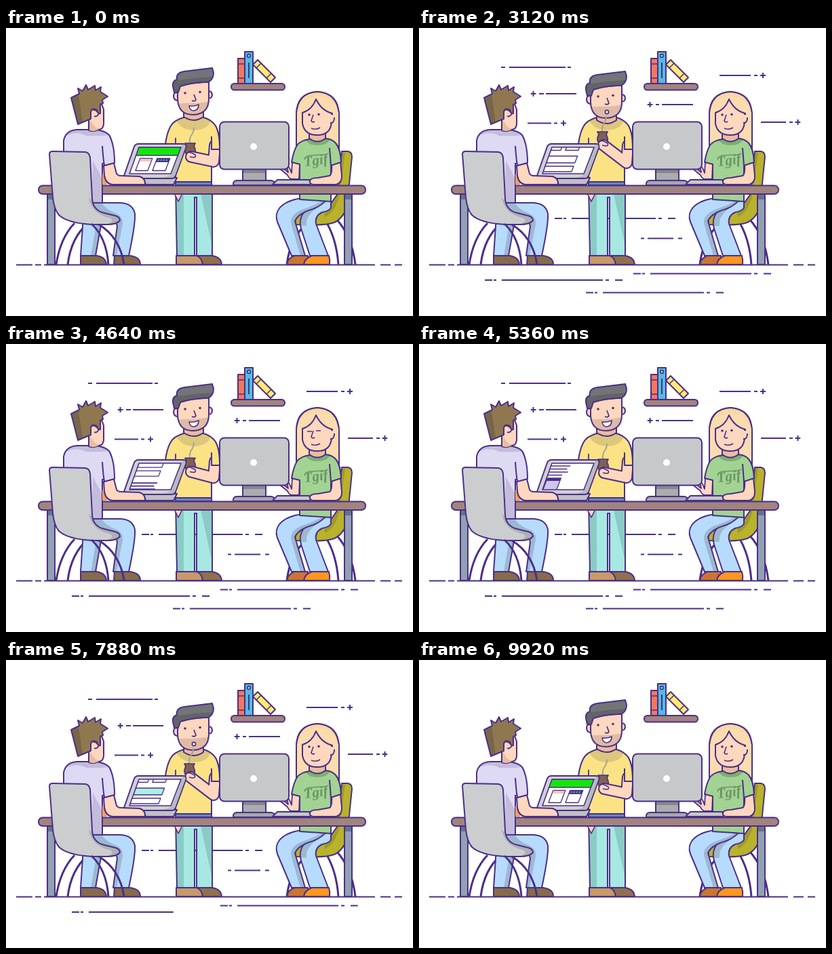
An HTML page with a canvas for the animation above (10000 ms loop, 600 by 425 pixels).

```html
<!DOCTYPE html>
<html lang="en">
<head>
<meta charset="utf-8">
<title>Team at a desk</title>
<style>
html, body { margin: 0; width: 100%; height: 100%; overflow: hidden; background: #fff; }
canvas { display: block; width: 600px; height: 425px; }
</style>
</head>
<body>
<canvas id="stage" width="600" height="425"></canvas>
<script>
const ctx = document.getElementById('stage').getContext('2d');
const LOOP = 10000;
const INK = '#4b2f8a';
const SKIN = '#fdd7be';
const SKIN_SHADE = '#e9bd9f';
const DENIM = '#b7dbfd';
const DENIM_SHADE = '#9db8d0';

const paths = new Map();
function path(d) {
  if (!paths.has(d)) paths.set(d, new Path2D(d));
  return paths.get(d);
}
function shape(d, fill, width = 2) {
  const p = path(d);
  if (fill) { ctx.fillStyle = fill; ctx.fill(p); }
  if (width) { ctx.lineWidth = width; ctx.strokeStyle = INK; ctx.stroke(p); }
}
const tint = (d, fill) => shape(d, fill, 0);
const line = (d, width = 2) => shape(d, null, width);

function box(x, y, w, h, r, fill, width = 2) {
  ctx.beginPath();
  ctx.roundRect(x, y, w, h, r);
  ctx.fillStyle = fill;
  ctx.fill();
  if (width) { ctx.lineWidth = width; ctx.strokeStyle = INK; ctx.stroke(); }
}
function dot(x, y, r, fill = INK, width = 0) {
  ctx.beginPath();
  ctx.arc(x, y, r, 0, Math.PI * 2);
  ctx.fillStyle = fill;
  ctx.fill();
  if (width) { ctx.lineWidth = width; ctx.strokeStyle = INK; ctx.stroke(); }
}
// Shade only the part of d that lies inside the outline.
function shaded(outline, fill, d, shade) {
  tint(outline, fill);
  ctx.save();
  ctx.clip(path(outline));
  tint(d, shade);
  ctx.restore();
  line(outline);
}
function keys(t, list) {
  let [t0, v0] = list[0];
  for (const [t1, v1] of list) {
    if (t < t1) {
      const k = Math.max(0, (t - t0) / (t1 - t0));
      return v0 + (v1 - v0) * k * k * (3 - 2 * k);
    }
    t0 = t1; v0 = v1;
  }
  return v0;
}

// Background dashes: height, solid parts, plus centre, start and exit times
const wide = x => [[x, x + 11], [x + 13, x + 17], [x + 25, x + 174], [x + 178, x + 183], [x + 192, x + 203]];
const streaks = [
  { y: 390.5, parts: wide(246), start: 60, exit: 7340 },
  { y: 372, parts: wide(97), start: 300, exit: 7720 },
  { y: 362.5, parts: wide(316), start: 480, exit: 7870 },
  { y: 70, parts: [[443, 489], [494, 499]], plus: 507, start: 680, exit: 8050 },
  { y: 58, parts: [[121, 127], [133, 216], [219, 224]], start: 1060, exit: 8380 },
  { y: 139, parts: [[504, 541], [546, 551]], plus: 558.5, start: 1180, exit: 8500 },
  { y: 140.5, parts: [[160, 195], [199, 204]], plus: 213, start: 1300, exit: 8650 },
  { y: 310.5, parts: [[327, 332], [337, 375], [382, 388]], start: 1400, exit: 8800 },
  { y: 281, parts: [[200, 211], [213, 217], [225, 349], [353, 358], [367, 378]], start: 1560, exit: 9060 },
  { y: 97, parts: [[177, 184], [187, 232]], plus: 168.5, start: 1860, exit: 9260, fromRight: true },
  { y: 113, parts: [[349, 354], [358, 404]], plus: 340.5, start: 2060, exit: 9400, fromRight: true }
];
function drawStreaks(t) {
  for (const s of streaks) {
    const p = keys(t, [[s.start, 0], [s.start + 500, 1], [s.exit, 1], [s.exit + 480, 0]]);
    if (p <= 0) continue;
    const xs = s.parts.flat();
    if (s.plus) xs.push(s.plus - 4, s.plus + 4);
    const left = Math.min(...xs), span = Math.max(...xs) - left;
    ctx.save();
    ctx.beginPath();
    ctx.rect(s.fromRight ? left + span * (1 - p) : left, s.y - 6, span * p, 12);
    ctx.clip();
    for (const [a, b] of s.parts) line(`M${a},${s.y}H${b}`);
    if (s.plus) line(`M${s.plus - 4},${s.y}h8M${s.plus},${s.y - 4}v8`);
    ctx.restore();
  }
}

function drawRoom() {
  line('M15,349.5H39M43,349.5H52M56,349.5H544M552,349.5H567M573,349.5H584');
  box(342, 45, 10, 37, 0, '#f4775c');
  line('M342,53h10M342,74h10', 1.5);
  box(352, 35, 12, 47, 0, '#52bde0');
  dot(358, 41, 2.4, '#8fdcf2', 1.6);
  line('M358,51V74');
  shape('M371,47L397,73L390,80L364,54Z', '#ffea70');
  line('M376,52l-7,7M391,67l-7,7', 1.5);
  box(332, 82, 79, 9.5, 4.5, '#a1847d');
}

function drawDesk() {
  box(61, 242, 11, 107, 0, '#91a1b1');
  box(499, 242, 11, 107, 0, '#91a1b1');
  tint('M62,245h9v8h-9zM500,245h9v8h-9z', '#64738b');
  box(48, 232.5, 482, 12.5, 6, '#a1847d');
}

function drawStander(sip, raise) {
  // Trousers and shoes
  shaded('M250,232H304V336H281V250H278V336H252Z', '#a7e8e2',
    'M249,245h13v92h-13zM287,245L304,322V245z', '#8bcbc6');
  line('M278,249V336M281,249V336', 1.5);
  shape('M251,336H281Q289,338 290,349H251Z', '#c89a68');
  shape('M282,336H304Q317,338 318,349H290Q289,340 282,336Z', '#91704e');
  shape('M250,227H303V232H250Z', '#638bc1');

  // Shirt
  shaded('M262,132Q247,136 242,146Q237,156 235,171L250,174V227H303V178H315Q315,153 308,143Q302,135 291,132Z',
    '#fbe285', 'M250,134Q256,150 277,151Q298,150 302,136L277,126Z', '#dcc77c');
  line('M250,162V174M303,160V178', 1.8);

  // Head
  ctx.save();
  ctx.translate(0, 5 * sip);
  shape('M262,122V131Q277,141 291,131V122Z', SKIN_SHADE);
  shape('M255,96Q247,93 247,101Q248,108 255,107', SKIN);
  shape('M298,93Q304,93 304,99Q303,105 298,103', SKIN);
  shaded('M253,84V105Q254,128 276,128Q299,127 299,104V79Z', SKIN,
    'M252,112Q264,110 277,111Q291,110 300,108V131H252Z', '#dfbba5');
  shaded('M248,95L246,86Q245,78 252,76Q250,66 263,64L304,59L306,66Q306,76 298,80Q279,79 257,86L254,95Z',
    '#727477', 'M245,76L254,77Q279,73 305,72L298,82L257,88L254,98H245Z', '#626469');
  dot(264, 96, 1.8);
  dot(286, 94.5, 1.8);
  line('M277,98L280,106Q278,109 274,107', 1.7);
  if (sip > .55) {
    dot(277, 119, 2.6, '#fff', 1.7);
  } else {
    shape('M270,115Q277,116 284,113Q284,121 277,122Q271,122 270,115Z', '#fff', 1.7);
  }
  ctx.restore();

  // Gourd, straw and arm
  const hand = { x: 273 - raise, y: 190 - 17 * raise };
  const elbow = { x: 306, y: 197 + 2 * raise };
  ctx.save();
  ctx.translate(hand.x - 273, hand.y - 190);
  ctx.lineWidth = 2;
  ctx.strokeStyle = '#a5a39a';
  ctx.stroke(path('M271,171Q270,162 274,157Q277,153 277,147'));
  shape('M264,170H279L277,174Q281,181 278,187H266Q262,181 266,174Z', '#80634e', 1.7);
  ctx.restore();
  const limb = new Path2D(`M308,173L${elbow.x},${elbow.y}L${hand.x},${hand.y}`);
  ctx.lineCap = 'round';
  for (const [color, w] of [[INK, 18], [SKIN, 14]]) {
    ctx.strokeStyle = color;
    ctx.lineWidth = w;
    ctx.stroke(limb);
  }
  ctx.lineCap = 'butt';
  shape(`M${hand.x - 7},${hand.y - 4}q3,-4 7,-2l6,3q2,4 -3,4l-5,-1`, SKIN, 1.6);
  tint('M298,145Q303,160 302,179H315Q315,154 308,144Z', '#fbe285');
  line('M303,160V179H315Q315,153 308,143');
}

function drawMonitor() {
  shape('M349,207H383V226H349Z', '#aaacaf');
  tint('M350,209h32v5h-32z', '#85878b');
  shape('M335,232V229Q336,225 341,225H391Q397,226 397,232Z', '#a5a8aa');
  box(315, 138.5, 102, 70, 7, '#c6c8ca');
  dot(365, 175, 5, '#fff');
  shape('M393,231L400,224H447L449,231Z', '#c6c8ca', 1.8);
}

function drawPage(t) {
  const scroll = keys(t, [[2200, 0], [3100, 30], [4250, 30], [5150, 72], [6750, 72], [7450, 30], [8500, 30], [9450, 0]]);
  const mark = (u, v, w, h, fill) => box(u, v, w, h, 0, fill, 1.4);
  ctx.save();
  ctx.clip(path('M196,176H258L243,215H182Z'));
  ctx.transform(1, 0, -.38, 1, 196, 176 - scroll);
  mark(-2, 0, 67, 12, '#14e60a');
  mark(8, 16.5, 18, 18, '#fff');
  tint('M9,17h16v4h-16z', '#f4c6bb');
  mark(33, 16.5, 19, 18, '#fff');
  tint('M33,16h19v6h-19z', INK);
  for (let i = 0; i < 4; i++) dot(36 + i * 4, 19, 1.2, '#42bd83');
  mark(4, 43, 50, 10, t > 6900 && t < 9300 ? '#aceee6' : '#fff');
  mark(4, 58, 50, 8, '#fff');
  line('M5,76H56M5,80.5H53M5,85H56M5,89.5H49', 1.7);
  mark(4, 94, 20, 19, t < 6000 ? '#cfc5ee' : '#bce9f2');
  mark(29, 94, 20, 19, '#cfc5ee');
  tint('M4,94h20v4h-20zM29,94h20v4h-20z', INK);
  ctx.restore();
}

function drawLaptop(t) {
  shape('M201,221H252L247,231H206Z', '#bfc1c4');
  shape('M195,171H261Q267,171 265,177L250,218Q248,222 244,222H178Q172,221 175,215L189,175Q191,171 195,171Z', '#cfd1d3');
  tint('M260,172Q266,172 264,177L249,218Q247,221 243,221H230Q243,220 246,211Z', '#b8bac0');
  tint('M196,176H258L243,215H182Z', '#fff');
  drawPage(t);
  line('M196,176H258L243,215H182Z', 1.6);
}

function drawSeatedMan() {
  line('M101,288Q80,310 74,349M121,288Q96,309 91,349', 3);
  // Legs and shoes
  shaded('M114,278L110,336H132L141,285Z', DENIM, 'M122,278h22l-11,58h-8l8,-46z', DENIM_SHADE);
  shape('M110,336H134Q147,338 148,349H110Z', '#866b4a');
  shaded('M124,258H169Q187,259 190,274Q191,289 181,336H158L164,292Q163,285 154,285H122Z',
    DENIM, 'M126,256H140Q146,268 163,274Q175,279 171,294L163,336H156L160,290L128,284Z', DENIM_SHADE);
  shape('M160,336H183Q198,338 198,349H159Z', '#866b4a');
  // Torso and arm
  shaded('M123,150H105Q88,151 85,166V203L119,258H142V200L159,199Q158,164 151,157Q146,152 133,150Z',
    '#dedaf4', 'M86,160Q104,151 118,159Q136,160 154,158L140,148H100ZM128,196L142,222V259H126Z', '#c3bddb');
  tint('M142,216Q149,216 149,231H142Z', '#f5a15a');
  shape('M144,203L159,199L163,215Q165,218 169,218L197,219Q206,222 205,231H157Q147,230 145,218Z', SKIN);
  shape('M142,174Q143,191 145,203L160,199Q160,172 152,158', '#dedaf4');
  // Head
  shape('M122,125V151Q130,154 136,150Q145,150 144,137V120L138,104H116Z', SKIN);
  tint('M123,132Q127,146 137,149Q131,154 123,151Z', SKIN_SHADE);
  shape('M124,134V123Q128,118 134,123L137,126Q134,132 130,130', SKIN, 1.8);
  shaded('M106,142L96,103L108,97L106,89L113,93L118,84L121,91L131,85L132,92L140,87L139,94L150,101L142,106L143,111L139,113V126Q135,127 134,121Q126,117 125,124V134Z',
    '#8f7850', 'M96,103L107,99L113,139L106,144Z', '#786648');
  // Chair
  shaded('M64,186Q64,182 69,182L117,183Q123,184 124,191L127,252Q128,269 145,273L161,277Q168,279 168,284Q163,290 149,290H127Q91,288 78,276Q71,268 69,250Z',
    '#cbcdcf', 'M122,250L128,256Q130,269 148,274L169,279V290H148Q163,284 152,280Q126,274 122,250Z', '#aeb0b4');
  line('M126,289Q148,309 151,349M137,290Q168,309 174,349', 3);
}

function drawSeatedWoman(blink) {
  line('M444,288Q419,309 414,349M470,283Q487,309 490,349M487,282Q510,307 515,349', 3);
  shaded('M495,182H504Q510,183 510,190L503,259Q500,279 484,287Q471,292 427,290L425,270L474,266L488,246Z',
    '#b9b22b', 'M495,183L500,184L491,249Q485,272 470,279L468,266L488,246Z', '#a09930');
  // Hair behind
  shape('M428,182V128Q428,96 459,94Q490,96 491,128V190H470L447,182Z', '#fbdcaf');
  // Legs and shoes
  shaded('M479,249V265Q477,270 466,272Q455,277 457,289L475,336H448L435,296Q431,283 439,272L445,252Z',
    DENIM, 'M480,253Q455,266 449,274Q442,281 443,292H434L430,272L480,249Z', DENIM_SHADE);
  shaded('M437,251H474Q466,262 453,267Q431,273 426,285L441,336H421L400,286Q396,275 403,266Q413,254 437,251Z',
    DENIM, 'M474,251Q455,262 439,267Q419,274 420,288L434,336H442L426,285Q434,273 460,267Z', DENIM_SHADE);
  shape('M414,349Q415,340 425,336H445V349Z', '#cb7531');
  shape('M439,349Q440,340 451,336H476Q478,342 477,349Z', '#ff961e');
  // Arms, neck and shirt
  shape('M432,223H421Q417,222 415,217L404,208L410,208L416,213L414,204Q417,202 421,214L422,198L433,200Z', SKIN, 1.8);
  shaded('M448,164Q434,166 429,173Q424,181 421,198L433,201V253L479,256V202L494,198Q493,178 486,170Q481,164 471,163Z',
    '#a2d392', 'M441,164Q445,173 459,173Q474,173 478,164L459,155Z', '#7caf73');
  shape('M447,155V163Q459,172 471,163V153Z', SKIN_SHADE);
  shape('M480,201L493,198L495,217Q496,228 487,231H454Q447,231 448,225Q450,221 460,221L477,218Q481,216 480,201Z', SKIN);
  shape('M477,177L479,203L494,198Q493,178 486,170', '#a2d392');
  ctx.save();
  ctx.translate(457, 198);
  ctx.rotate(-.14);
  ctx.fillStyle = ctx.strokeStyle = '#6b9566';
  ctx.textAlign = 'center';
  ctx.font = 'italic bold 21px "Liberation Serif", serif';
  ctx.fillText('Tgif', 0, 4);
  ctx.lineWidth = 1.5;
  ctx.stroke(path('M-16,-6Q-14,-12 -6,-11L17,-9'));
  ctx.restore();
  // Face and fringe
  shape('M437,116V141Q440,158 459,158Q479,158 480,138V116Q471,105 457,105Z', SKIN);
  shape('M479,127Q485,126 484,134Q483,141 478,140', SKIN);
  shaded('M428,128Q429,96 459,94Q489,96 491,128L481,126Q465,122 457,105Q451,121 437,125Z',
    '#f9d8a4', 'M428,129Q431,103 459,101Q487,103 491,129L481,126Q465,122 457,105Q451,121 437,125Z', '#fbdcaf');
  tint('M429,124h7v8h-7zM482,124h8v8h-8z', '#fbdcaf');
  if (blink) {
    line('M444,129h7M457,128h7', 1.5);
  } else {
    dot(447, 128, 1.8);
    dot(461, 127.5, 1.8);
  }
  line('M453,128L450,137Q452,140 455,138M450,148Q457,151 463,147', 1.6);
}

function draw(t) {
  const sip = keys(t, [[2450, 0], [2900, 1], [3650, 1], [4080, 0], [7300, 0], [7750, 1], [8480, 1], [8900, 0]]);
  const raise = keys(t, [[2150, 0], [2800, 1], [3950, 1], [4800, 0], [6950, 0], [7650, 1], [8700, 1], [9350, 0]]);
  const blink = Math.abs(t % 2000 - 640) < 90;
  ctx.fillStyle = '#fff';
  ctx.fillRect(0, 0, 600, 425);
  ctx.lineJoin = 'round';
  ctx.lineCap = 'butt';
  drawStreaks(t);
  drawRoom();
  drawStander(sip, raise);
  drawSeatedWoman(blink);
  shape('M248,244L254,256L260,244Z', SKIN, 1.6);
  drawDesk();
  drawMonitor();
  drawLaptop(t);
  drawSeatedMan();
}

function tick() {
  draw(performance.now() % LOOP);
  requestAnimationFrame(tick);
}
tick();
</script>
</body>
</html>
```
